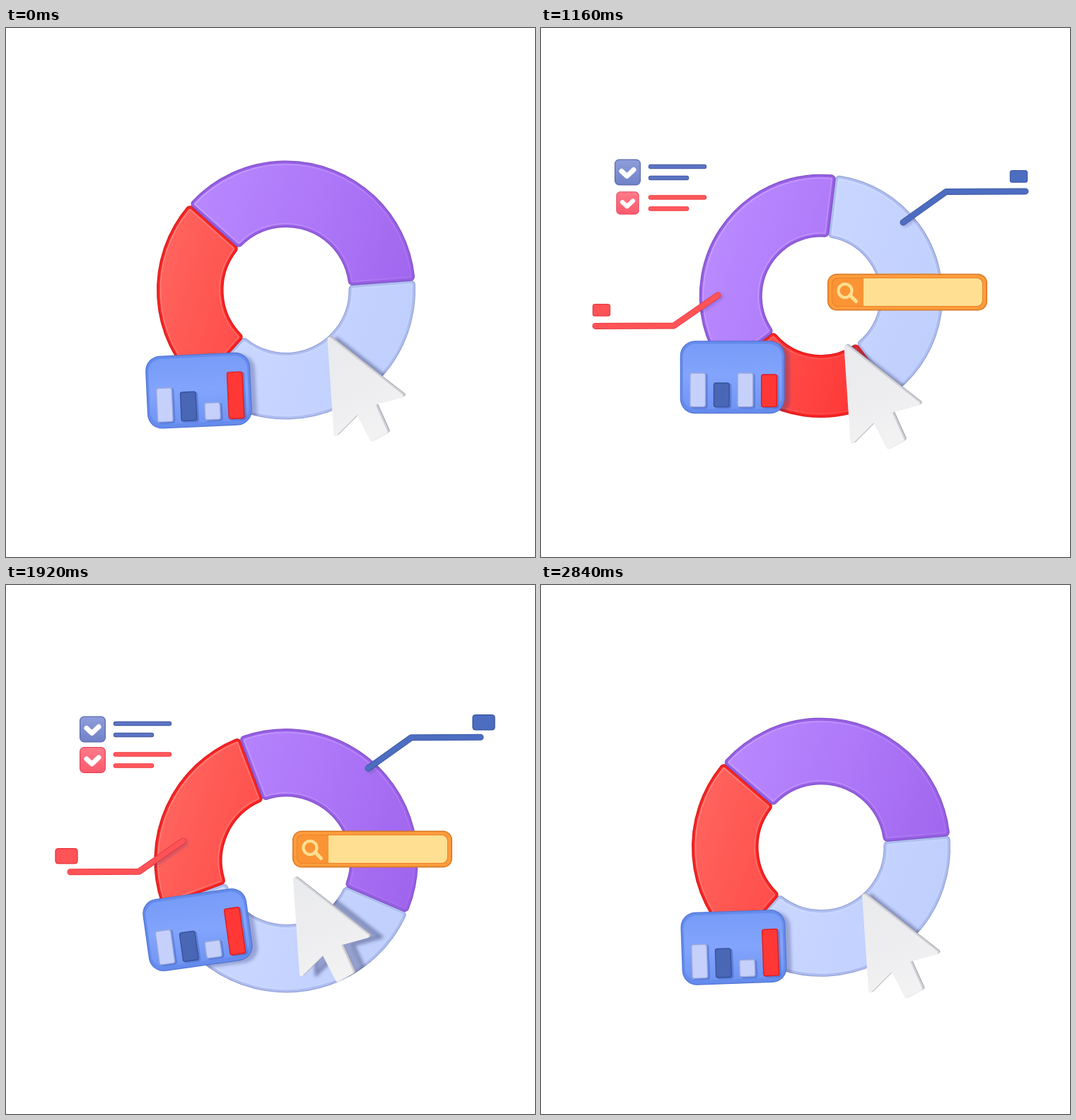
An HTML page with a canvas for the animation above (2.88 s loop, 748 by 748 pixels).

```html
<!DOCTYPE html>
<html lang="en">
<head>
<meta charset="utf-8">
<title>Dashboard chart</title>
<style>
html, body { margin: 0; width: 100%; height: 100%; overflow: hidden; background: #fff; }
canvas { display: block; width: 100vmin; height: 100vmin; }
</style>
</head>
<body>
<canvas id="stage" width="748" height="748"></canvas>
<script>
const ctx = document.getElementById('stage').getContext('2d');
const LOOP = 2880, SWAY = LOOP / 2, RAD = Math.PI / 180;

// Motion helpers: idle swaying, eased steps, short bumps and springy pops.
const clamp = x => Math.min(1, Math.max(0, x));
const smooth = x => { x = clamp(x); return x * x * (3 - 2 * x); };
const step = (t, start, end) => smooth((t - start) / (end - start));
const sway = (t, peak, period = SWAY) => Math.cos(2 * Math.PI * (t - peak) / period);
const bump = (t, peak) => smooth(1 - Math.abs(t - peak) / 320);
const spring = (u, swings) => smooth(u / 160)
  + .13 * Math.sin(swings * Math.PI * clamp((u - 90) / (140 * swings)));
const pop = (t, start, end, stretch = 1) => t <= start || t >= end ? 0
  : spring((t - start) / stretch, 2) * spring((end - t) / stretch, 1);

const PRESS = 840, REBOUND = 1160, TURN = 1640, REST = 2200;

function gradient(x0, y0, x1, y1, ...colors) {
  const g = ctx.createLinearGradient(x0, y0, x1, y1);
  colors.forEach((c, i) => g.addColorStop(i / (colors.length - 1), c));
  return g;
}

function box(x, y, w, h, r, fill) {
  ctx.beginPath();
  ctx.roundRect(x, y, w, h, r);
  ctx.fillStyle = fill;
  ctx.fill();
}

function bevelBox(x, y, w, h, r, fill, edge, width = 1.2) {
  box(x, y, w, h, r, edge);
  box(x + width, y + width, w - 2 * width, h - 2 * width, Math.max(0, r - width), fill);
}

function line(points, width, color) {
  ctx.beginPath();
  points.forEach(([x, y]) => ctx.lineTo(x, y));
  ctx.lineWidth = width;
  ctx.lineCap = ctx.lineJoin = 'round';
  ctx.strokeStyle = color;
  ctx.stroke();
}

function placed(x, y, turn, scale, draw) {
  ctx.save();
  ctx.translate(x, y);
  ctx.rotate(turn * RAD);
  ctx.scale(scale, scale);
  draw();
  ctx.restore();
}

const SLICES = [
  { from: -4.3, to: 132, edge: '#aebdf0', rim: '#8f9dd2', face: ['#cfdbff', '#c7d5ff', '#bfcffd'] },
  { from: 132, to: 221.6, edge: '#f52322', rim: '#d9191b', face: ['#ff655f', '#ff4845', '#fd2b2a'] },
  { from: 221.6, to: 355.7, edge: '#965fe2', rim: '#7f50c4', face: ['#ba8bff', '#ae78f9', '#9e63ec'] }
];

function slicePath(slice, turn, outer, inner, inset) {
  const a0 = (slice.from + turn) * RAD, a1 = (slice.to + turn) * RAD;
  const big = outer - inset, small = inner + inset, gap = inset - .4;
  ctx.beginPath();
  ctx.arc(0, 0, big, a0 + gap / big, a1 - gap / big);
  ctx.arc(0, 0, small, a1 - gap / small, a0 + gap / small, true);
  ctx.closePath();
}

function drawRing(t) {
  const scale = 1 - .15 * step(t, 450, PRESS) + .19 * step(t, PRESS, 1500) - .04 * step(t, TURN, REST);
  const turn = 6 * (sway(t, 180) - Math.SQRT1_2)
    - 72 * step(t, 450, REBOUND) + 133 * step(t, REBOUND, TURN) - 61 * step(t, TURN, REST);
  const outer = 183 * scale, inner = 88.5 * scale;
  placed(396, 383.3 - 12.8 * sway(t, 0), 0, 1, () => {
    ctx.lineJoin = 'round';
    for (const slice of SLICES) {
      const layer = (inset, radius, color) => {
        slicePath(slice, turn, outer, inner, inset + radius);
        ctx.fillStyle = ctx.strokeStyle = color;
        ctx.lineWidth = 2 * radius;
        ctx.fill();
        ctx.stroke();
      };
      layer(0, 6, slice.rim);
      layer(1, 5, slice.edge);
      layer(4, 3, gradient(-outer, -60, outer, 60, ...slice.face));
      slicePath(slice, turn, outer, inner, 5.5);
      ctx.strokeStyle = gradient(-outer, -outer, outer, outer, 'rgba(255,255,255,.25)', 'rgba(255,255,255,0)');
      ctx.lineWidth = 1.5;
      ctx.stroke();
    }
  });
}

// The card sways and is kicked down when the chart is pressed.
function placeCard(t, shift, draw) {
  const y = 496 + 16.7 * sway(t, 0) + 45 * bump(t, PRESS) - 8 * (bump(t, 360) + bump(t, REBOUND));
  const turn = -4 + 4 * sway(t, REBOUND) + 9 * bump(t, PRESS);
  placed(271.5 + sway(t, 0, LOOP) + shift, y, turn, 1, draw);
}

function drawCard(t) {
  const bars = [
    { height: 49 + 11 * bump(t, PRESS), fill: '#c5d0fb', edge: '#9aa8dc' },
    { height: 42 - 7 * bump(t, REBOUND) + 7 * bump(t, TURN), fill: '#4a67b6', edge: '#37529b' },
    { height: 25 + 24 * bump(t, REBOUND) - 6 * bump(t, TURN), fill: '#c5d0fb', edge: '#9aa8dc' },
    { height: 67 - 20 * bump(t, REBOUND), fill: '#ff3835', edge: '#df1c20' }
  ];
  placeCard(t, 0, () => {
    bevelBox(-74, -51.5, 148, 103, 21, '#658bed', '#5076d2');
    box(-70, -47, 140, 92, 18, gradient(0, -48, 0, 46, '#779cf7', '#82a4fd', '#6f94f2'));
    bars.forEach(({ height, fill, edge }, i) => {
      const x = -60.5 + i * 33.6, y = 42.5 - height;
      box(x + 2, y + 1, 23.5, height + 1, 4, 'rgba(45,75,165,.35)');
      bevelBox(x, y, 23, height, 3.5, fill, edge, 1.4);
    });
  });
}

function leaderPath(start, bend, end, progress) {
  const first = Math.hypot(bend[0] - start[0], bend[1] - start[1]);
  const rest = Math.abs(end[0] - bend[0]), drawn = progress * (first + rest);
  const mix = (a, b, u) => [a[0] + (b[0] - a[0]) * u, a[1] + (b[1] - a[1]) * u];
  const points = [start, mix(start, bend, clamp(drawn / first))];
  if (drawn > first) points.push(mix(bend, end, (drawn - first) / rest));
  return points;
}

function leaders(t) {
  const y = 269.5 + 24.2 * sway(t, 812, 1630);
  const progress = step(t, 40, 790) - step(t, 1800, 2520);
  if (progress < .005) return [];
  return [
    { path: leaderPath([512, y], [573, y - 43.5], [685, y - 44], progress), color: '#4d6dc1', edge: '#3b569f', tag: [675.5, y - 65] },
    { path: leaderPath([250, y + 103], [188, y + 146], [77, y + 146.5], progress), color: '#ff5357', edge: '#e6343b', tag: [85.5, y + 124] }
  ];
}

function drawLeaders(t) {
  const size = pop(t, 775, 2110, 1.2);
  for (const { path, color, edge, tag } of leaders(t)) {
    line(path, 9, edge);
    line(path, 7.4, color);
    if (size) placed(...tag, 0, size, () => bevelBox(-14.3, -10, 28.6, 20, 4, color, edge));
  }
}

const ROWS = [
  { color: '#5c74c4', edge: '#43579f', fill: ['#8e9ddb', '#7081c8'], rim: '#5b6bae' },
  { color: '#ff5a5e', edge: '#f0373d', fill: ['#ff7b89', '#fb5a6d'], rim: '#e8435a' }
];

// Boxes and text lines pop in and out one after another.
function drawList(t) {
  ROWS.forEach((row, r) => {
    const y = 204 + 43.5 * r;
    [76, 51].forEach((length, i) => {
      const order = 2 * r + i, grow = pop(t, 585 + 50 * order, 2280 + 75 * order);
      if (!grow) return;
      const points = [[155, y - 8 + 16 * i], [155 + length * grow, y - 8 + 16 * i]];
      line(points, 6.4, row.edge);
      line(points, 4.6, row.color);
    });
    const size = pop(t, 600 + 215 * r, 2435 + 150 * r, 1.2);
    if (size) placed(122.5, y, 0, size, () => {
      bevelBox(-18.5, -18.5, 37, 37, 6.5, gradient(0, -18, 0, 18, ...row.fill), row.rim);
      line([[-8.5, -1.5], [-1, 5.5], [8.5, -3.5]], 7, '#fff');
    });
  });
}

function drawSearch(t) {
  const scale = (step(t, 100, 400) - step(t, 2340, 2650)) * (1 - .15 * bump(t, PRESS));
  if (scale < .005) return;
  placed(432, 374, -9 + 9 * step(t, PRESS, REBOUND), scale, () => {
    bevelBox(-27, -26.5, 226, 52, 13, '#ff9c3d', '#d97620', 1.5);
    box(-21, -21, 214, 41, 8, '#e98529');
    box(-20, -20, 45, 39, [8, 0, 0, 8], '#fb9435');
    box(24, -20, 168, 39, [0, 8, 8, 0], '#ffe092');
    const handle = 4 + 8.5 * step(t, 360, 560);
    if (handle > 4) line([[5, 4], [handle + 1, handle]], 5, '#ffe092');
    ctx.beginPath();
    ctx.arc(-2, -2.5, 9.5, 0, 2 * Math.PI);
    ctx.lineWidth = 4.2;
    ctx.strokeStyle = '#ffe092';
    ctx.stroke();
  });
}

const ARROW = [[3, 3], [105, 83], [65, 94], [83, 134], [63, 145], [43, 106], [12, 137]];
const STOPS = [[0, 454, 437], [360, 432, 378], [PRESS, 457, 406], [REBOUND, 428, 448], [TURN, 397, 414], [REST, 414, 413], [LOOP, 454, 437]];

function arrow(dx, dy, color) {
  placed(dx, dy, 0, 1, () => {
    line([...ARROW, ...ARROW.slice(0, 2)], 5, color);
    ctx.fillStyle = color;
    ctx.fill();
  });
}

function placeCursor(t, dx, dy, draw) {
  const next = STOPS.findIndex(stop => stop[0] > t);
  const [t0, x0, y0] = STOPS[next - 1], [t1, x1, y1] = STOPS[next], u = step(t, t0, t1);
  placed(x0 + (x1 - x0) * u + dx, y0 + (y1 - y0) * u + dy, 0, 1 - .035 * bump(t, PRESS), draw);
}

function drawCursor(t) {
  placeCursor(t, 0, 0, () => {
    for (let i = 4; i > 0; i--) arrow(i * .8, -i * .4, i > 3 ? '#9a9aa4' : '#cfcfd6');
    arrow(0, 0, gradient(0, 0, 60, 140, '#e9eaec', '#ededef', '#f2f2f3'));
  });
}

// Shadows fall on the ring only.
function drawShadows(t) {
  ctx.save();
  ctx.globalCompositeOperation = 'source-atop';
  ctx.filter = 'blur(2px)';
  placeCard(t, 7, () => box(-74, -48.5, 148, 103, 21, 'rgba(55,60,125,.32)'));
  for (const { path } of leaders(t)) line(path.map(([x, y]) => [x + 3, y + 2]), 9, 'rgba(55,50,125,.25)');
  const lift = 14 + 7 * sway(t, 480);
  ctx.globalAlpha = .32;
  placeCursor(t, lift, lift / 4 - 4, () => arrow(0, 0, '#343969'));
  ctx.restore();
}

function render(t) {
  ctx.clearRect(0, 0, 748, 748);
  drawRing(t);
  drawShadows(t);
  drawCard(t);
  drawLeaders(t);
  drawList(t);
  drawSearch(t);
  drawCursor(t);
}

const began = performance.now();
function tick() {
  render((performance.now() - began) % LOOP);
  requestAnimationFrame(tick);
}
tick();
</script>
</body>
</html>
```
